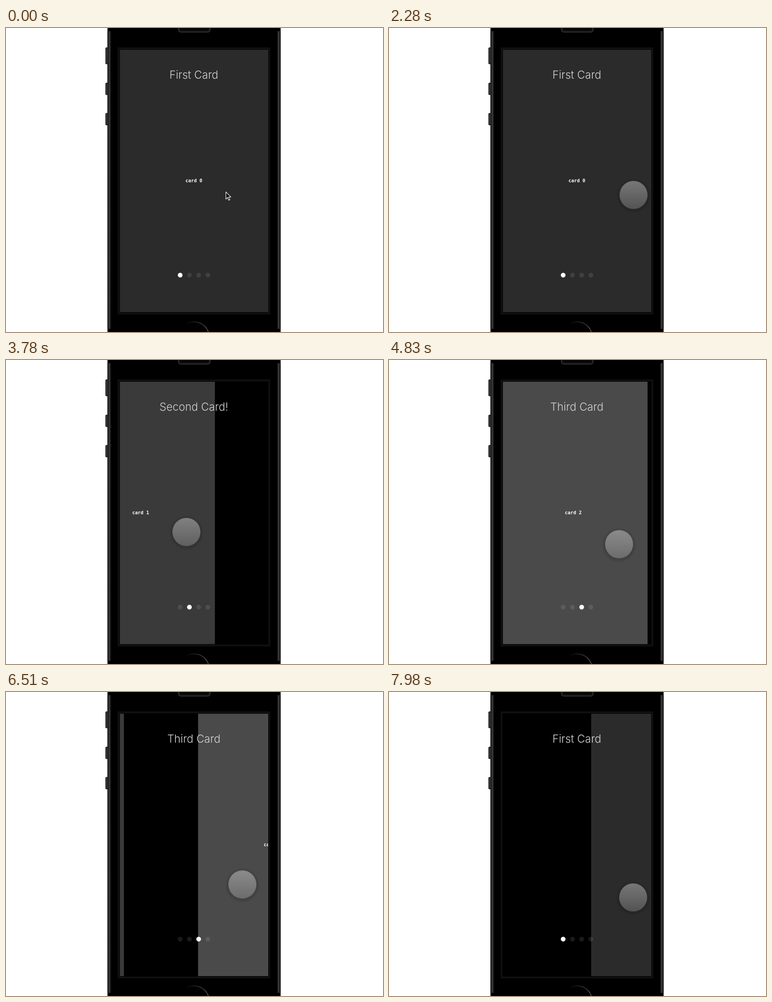
An HTML page for the animation above (8 s loop, 834 by 672 pixels).

```html
<!DOCTYPE html>
<html lang="en">
<head>
<meta charset="utf-8">
<title>Swipe cards</title>
<style>
  html, body { margin: 0; width: 100%; height: 100%; overflow: hidden; background: #fff; }
  svg { display: block; width: 834px; height: 672px; }
  .title { font: 300 24px Inter, "Liberation Sans", sans-serif; fill: #d2d2d2; text-anchor: middle; }
  .label { font: bold 10.3px "DejaVu Sans Mono", monospace; fill: #fff; text-anchor: middle; }
</style>
</head>
<body>
<svg viewBox="0 0 834 672">
  <defs>
    <linearGradient id="edge">
      <stop offset="0" stop-color="#0c0c0c"/>
      <stop offset=".2" stop-color="#333"/>
      <stop offset=".4" stop-color="#1c1c1c"/>
      <stop offset=".6" stop-color="#4c4c4c"/>
      <stop offset=".75" stop-color="#111"/>
      <stop offset="1" stop-color="#000"/>
    </linearGradient>
    <linearGradient id="key">
      <stop offset="0" stop-color="#111"/>
      <stop offset=".4" stop-color="#4a4a4a"/>
      <stop offset="1" stop-color="#111"/>
    </linearGradient>
    <linearGradient id="home">
      <stop offset=".2" stop-color="#000"/>
      <stop offset=".6" stop-color="#333"/>
      <stop offset="1" stop-color="#555"/>
    </linearGradient>
    <linearGradient id="ball" x2="0" y2="1">
      <stop offset="0" stop-color="#fff" stop-opacity=".36"/>
      <stop offset="1" stop-color="#fff" stop-opacity=".19"/>
    </linearGradient>
    <radialGradient id="shade">
      <stop offset=".78" stop-color="#000" stop-opacity="0"/>
      <stop offset=".8" stop-color="#000" stop-opacity=".16"/>
      <stop offset="1" stop-color="#000" stop-opacity="0"/>
    </radialGradient>
    <clipPath id="screen"><rect x="252" y="48" width="328" height="580"/></clipPath>
  </defs>
  <rect width="834" height="672" fill="#fff"/>
  <g fill="url(#key)" stroke="#0a0a0a">
    <rect x="220.5" y="43.5" width="6" height="36" rx="1.5"/>
    <rect x="220.5" y="121.5" width="6" height="26" rx="1.5"/>
    <rect x="220.5" y="188.5" width="6" height="26" rx="1.5"/>
  </g>
  <rect x="224.5" width="383" height="672"/>
  <rect x="224.5" y="7" width="8.5" height="658" fill="url(#edge)"/>
  <rect x="-607.5" y="7" width="8.5" height="658" fill="url(#edge)" transform="scale(-1 1)"/>
  <rect x="381.5" y="-12" width="70" height="21" rx="5" fill="#111" stroke="#3c3c3c" stroke-width="1.5"/>
  <rect x="385" y="-12" width="63" height="17" rx="4" fill="#050505"/>
  <circle cx="416" cy="683" r="33.5" fill="none" stroke="url(#home)" stroke-width="1.6"/>
  <rect x="249" y="45" width="333.5" height="586" fill="#000" stroke="#101010" stroke-width="4"/>
  <g id="cards" clip-path="url(#screen)"></g>
  <text id="title" class="title" x="415.6" y="111.5"></text>
  <g id="dots"></g>
  <g id="touch">
    <circle cy="2" r="39" fill="url(#shade)"/>
    <circle r="31" fill="url(#ball)"/>
  </g>
  <path id="arrow" d="M486.500 362.500v15.500l3.600-3.400 2.700 6 2.400-1-2.600-5.900h4.700z" fill="#000" stroke="#fff" stroke-width="1.200"/>
</svg>
<script>
const LOOP = 8000, STEP = 30, DRAG = 130, SETTLE = 420, PITCH = 492;
const titles = ["First Card", "Second Card!", "Third Card", "Fourthies"];
const shades = ["#2b2b2b", "#3a3a3a", "#4a4a4a", "#5a5a5a"];

// start time, finger x at start and end, card before the swipe
const swipes = [
  [2610, 517, 285, 0],
  [3714.3, 517, 285, 1],
  [4815.5, 517, 285, 2],
  [5702.6, 350, 573, 3],
  [6428, 350, 600, 2],
  [7152.6, 375, 620, 1],
  [7896.3, 345, 620, 0]
];
// finger path before the first swipe: time, x, y
const intro = [
  [330, 487, 364], [480, 462, 260], [630, 425, 204], [800, 378, 270], [990, 380, 362],
  [1350, 380, 362], [1600, 420, 300], [1850, 490, 300], [2100, 541, 369], [2280, 541, 369], [2560, 517, 371]
];
const heights = [[2280, 369], [3780, 380], [4830, 407], [5760, 413], [7170, 436], [7980, 454]];

const $ = id => document.getElementById(id);
const clamp = u => Math.min(1, Math.max(0, u));
const smooth = u => (u = clamp(u), u * u * (3 - 2 * u));
const easeOut = u => 1 - (1 - clamp(u)) ** 3;
const mix = (a, b, u) => a + (b - a) * u;

function add(parent, tag, attrs) {
  const el = document.createElementNS("http://www.w3.org/2000/svg", tag);
  for (const k in attrs) el.setAttribute(k, attrs[k]);
  return parent.appendChild(el);
}

function along(keys, t, col) {
  let i = 0;
  while (i < keys.length - 2 && t >= keys[i + 1][0]) i++;
  const a = keys[i], b = keys[i + 1];
  return mix(a[col], b[col], clamp((t - a[0]) / (b[0] - a[0])));
}

const cards = titles.map((_, i) => {
  const g = add($("cards"), "g", {});
  add(g, "rect", { x: 252, y: 48, width: 328, height: 580, fill: shades[i] });
  add(g, "text", { x: 415.7, y: 341, class: "label" }).textContent = "card " + i;
  return g;
});
const dots = titles.map((_, i) =>
  add($("dots"), "circle", { cx: 385.3 + 20.45 * i, cy: 546.3, r: 5.2, fill: "#fff" }));

function state(t) {
  const n = swipes.findLastIndex(s => t >= s[0]);
  if (n < 0) return { x: along(intro, t, 1), y: t < 2280 ? along(intro, t, 2) : along(heights, t, 1), shift: 0, base: 0, page: 0 };
  const [start, from, to, base] = swipes[n];
  const d = t - start, dir = Math.sign(to - from), y = along(heights, t, 1);
  if (d < DRAG) {
    const x = mix(from, to, smooth(d / DRAG));
    return { x, y, shift: x - from, base, page: base };
  }
  const next = swipes[n + 1] || swipes[n];
  const back = next[0] - start - DRAG - 120;
  return {
    x: mix(to, next[1], smooth((d - DRAG - 60) / back)), y, base,
    shift: mix(to - from, dir * PITCH, easeOut((d - DRAG) / SETTLE)),
    page: base - dir
  };
}

function draw(ms) {
  const t = Math.floor((ms % LOOP) / STEP) * STEP;
  const s = state(t);
  cards.forEach((g, i) => g.setAttribute("transform", `translate(${(i - s.base) * PITCH + s.shift} 0)`));
  dots.forEach((c, i) => c.setAttribute("fill-opacity", i === s.page ? 1 : 0.1));
  $("title").textContent = titles[s.page];
  $("touch").setAttribute("transform", `translate(${s.x} ${s.y})`);
  $("touch").style.display = t < 90 ? "none" : "";
  $("arrow").style.display = t < 90 ? "" : "none";
}

let origin;
function tick(now) {
  origin ??= now;
  draw(now - origin);
  requestAnimationFrame(tick);
}
draw(0);
requestAnimationFrame(tick);
</script>
</body>
</html>
```
